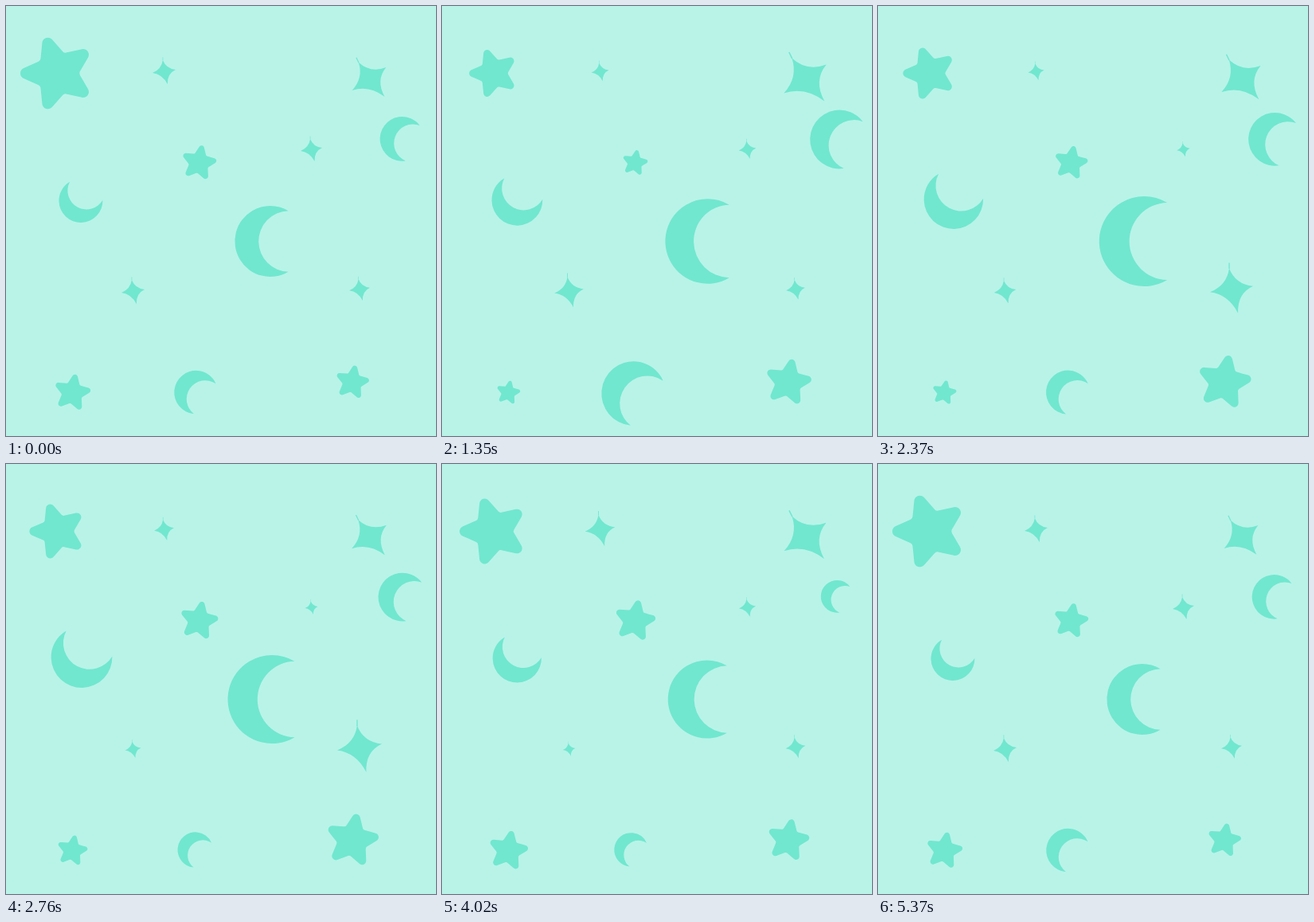
Animation, 540 px wide and 540 px high, one loop 5.4 s. Source, as an HTML page with a canvas:

```html
<!DOCTYPE html>
<html lang="en">
<head>
<meta charset="utf-8">
<title>Night sky</title>
<style>
  html, body { margin: 0; width: 100%; height: 100%; overflow: hidden; background: #b9f3e8; }
  canvas { display: block; width: 540px; height: 540px; }
</style>
</head>
<body>
<canvas id="sky"></canvas>
<script>
const SIZE = 540, LOOP = 5400;
const BACK = '#b9f3e8', INK = '#71e7cf';
const canvas = document.getElementById('sky');
const ctx = canvas.getContext('2d');
const dpr = window.devicePixelRatio || 1;
canvas.width = canvas.height = SIZE * dpr;

// Every shape is drawn about one unit wide around the point it grows from.

function drawStar() {
  const pt = i => {
    const r = i % 2 ? 0.3 : 0.645, a = i * Math.PI / 5;
    return [r * Math.cos(a), r * Math.sin(a)];
  };
  const a = pt(0), b = pt(9);
  ctx.moveTo((a[0] + 2 * b[0]) / 3, (a[1] + 2 * b[1]) / 3);
  for (let i = 0; i < 10; i++) {
    ctx.arcTo(...pt(i), ...pt(i + 1), i % 2 ? 0.05 : 0.08);
  }
}

// A disc with a smaller disc bitten out of its right side.
function drawMoon() {
  const r = 0.5, bite = 0.43, gap = 0.265, mid = 0.1;
  const x = (r * r - bite * bite + gap * gap) / (2 * gap);
  const y = Math.sqrt(r * r - x * x);
  const outer = Math.atan2(y, x), inner = Math.atan2(y, x - gap);
  ctx.arc(mid, 0, r, outer, -outer);
  ctx.arc(mid + gap, 0, bite, -inner, inner, true);
}

// Four hollow sides between the tips, and a thin sliver above the top one.
function drawSparkle() {
  const tips = [[-0.055, -0.48], [0.5, -0.07], [0.15, 0.56], [-0.5, 0.07]];
  const hollow = 0.2;
  ctx.moveTo(...tips[0]);
  tips.forEach(([x, y], i) => {
    const [u, v] = tips[(i + 1) % 4];
    ctx.quadraticCurveTo((x + u) * hollow, (y + v) * hollow, u, v);
  });
  ctx.rect(-0.066, -0.61, 0.024, 0.14);
}

const items = [];
const put = (shape, turn) => (x, y, size, ...swings) =>
  items.push({ shape, turn: turn * Math.PI / 180, x, y, size, swings });

const star = put(drawStar, -8);
const moon = turn => put(drawMoon, turn);
const sparkle = put(drawSparkle, 0);

// Place and resting size, then the turning points of the pulse:
// percent of the loop and scale there. Each pulse starts and ends at rest.
put(drawStar, 180)(64.8, 84.5, 89, [23, 0.655]);
star(242.3, 197, 42, [25, 0.73], [64, 1.22]);
star(83.2, 485.6, 44, [35, 0.57], [69, 1.15], [87, 0.83]);
star(434.8, 472.6, 40.5, [43, 1.6]);

moon(0)(323, 295.5, 89, [39, 1.275]);
moon(22)(492.3, 164.8, 55.8, [25, 1.325], [92, 0.615]);
moon(-61)(91.3, 249.3, 55, [58, 1.41], [87, 0.92]);
moon(36)(234.1, 481.9, 54.5, [21, 1.5], [61, 0.7]);

sparkle(198.5, 82, 29, [39, 0.665], [72, 1.31]);
sparkle(383.5, 180, 27, [51, 0.59]);
sparkle(159.5, 358, 29, [29, 1.28], [64, 0.43]);
sparkle(444, 355.5, 26, [16, 0.65], [49, 2.17], [86, 0.61]);
put(drawSparkle, -26)(456, 91.5, 51, [34, 1.3], [53, 1.02], [83, 1.29]);

const ease = p => (1 - Math.cos(Math.PI * p)) / 2;

function pulse(swings, percent) {
  let [t0, s0] = [0, 1];
  for (const [t1, s1] of [...swings, [100, 1]]) {
    if (percent < t1) return s0 + (s1 - s0) * ease((percent - t0) / (t1 - t0));
    [t0, s0] = [t1, s1];
  }
  return 1;
}

function draw(percent) {
  ctx.setTransform(dpr, 0, 0, dpr, 0, 0);
  ctx.fillStyle = BACK;
  ctx.fillRect(0, 0, SIZE, SIZE);
  ctx.fillStyle = INK;
  for (const { shape, turn, x, y, size, swings } of items) {
    const scale = size * pulse(swings, percent);
    ctx.save();
    ctx.translate(x, y);
    ctx.rotate(turn);
    ctx.scale(scale, scale);
    ctx.beginPath();
    shape();
    ctx.closePath();
    ctx.fill();
    ctx.restore();
  }
}

const start = performance.now();
function frame() {
  draw((performance.now() - start) % LOOP / LOOP * 100);
  requestAnimationFrame(frame);
}
frame();
</script>
</body>
</html>
```
